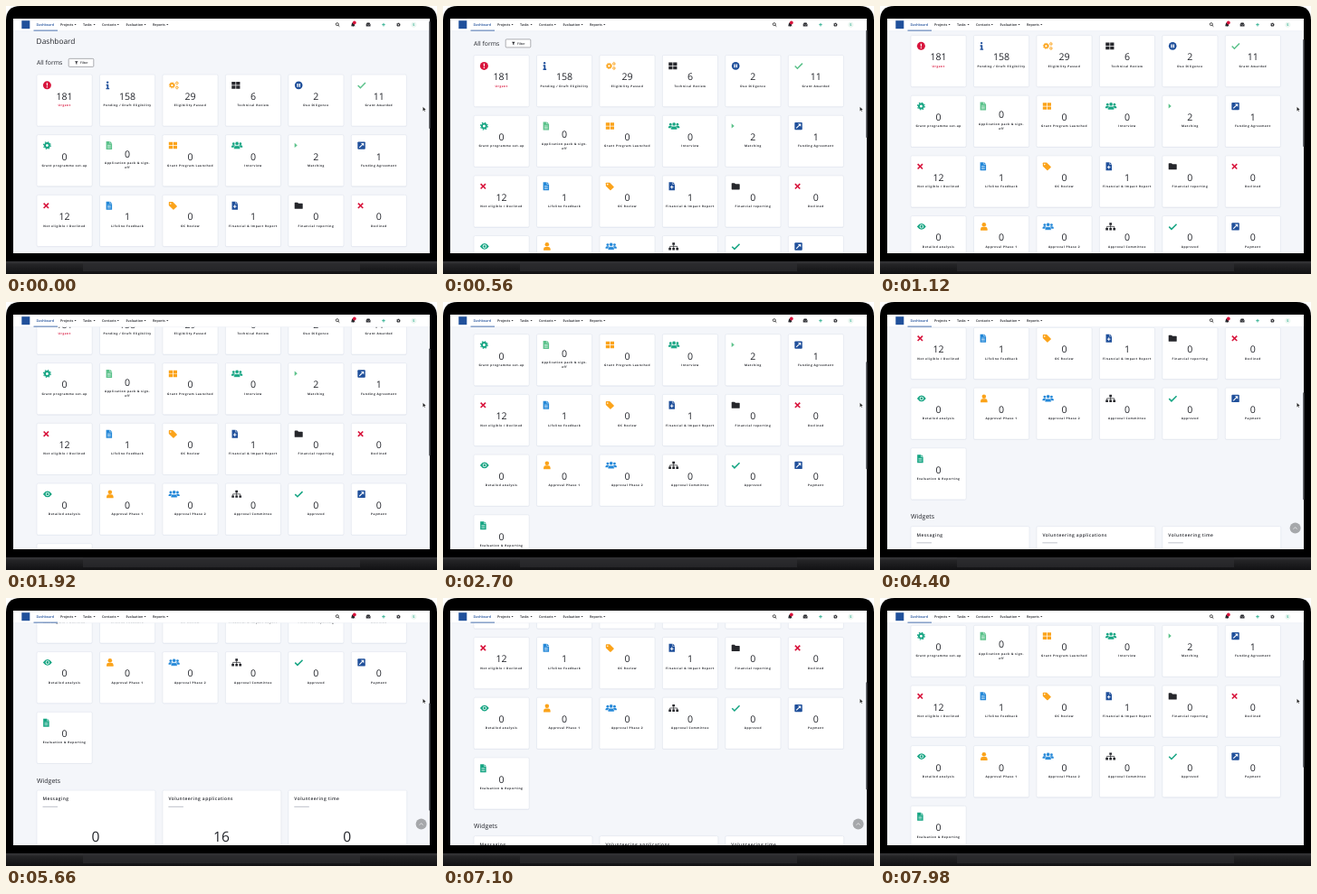
Animation, 476 px wide and 297 px high, one loop 8000 ms. Source, as an HTML page:

```html
<!DOCTYPE html>
<html lang="en">
<head>
<meta charset="utf-8">
<title>Dashboard</title>
<style>
  html, body { margin: 0; width: 100%; height: 100%; overflow: hidden; background: #fff; }
  svg { display: block; width: 100vw; height: 100vh; }
  text { font-family: "Open Sans", "Noto Sans", sans-serif; fill: #23252b; text-rendering: geometricPrecision; }
  .num { font-size: 10.6px; text-anchor: middle; }
  .big { font-size: 15.6px; text-anchor: middle; }
  .label { font-size: 3.2px; font-weight: 700; letter-spacing: .5px; text-anchor: middle; }
  .title { font-size: 4.9px; font-weight: 600; letter-spacing: .45px; }
  .nav { font-size: 3.7px; font-weight: 600; }
  .card { fill: #fff; stroke: #e3e7ef; stroke-width: .7; }
</style>
</head>
<body>
<svg viewBox="0 0 476 297" preserveAspectRatio="none">
  <defs>
    <clipPath id="view"><rect x="8" y="14" width="460" height="260"/></clipPath>
    <linearGradient id="base" x2="0" y2="1">
      <stop offset="0" stop-color="#38383b"/>
      <stop offset=".25" stop-color="#242426"/>
      <stop offset="1" stop-color="#111113"/>
    </linearGradient>
  </defs>
  <path d="M0 297V16Q0 0 16 0H460Q476 0 476 16V297Z"/>
  <rect y="283" width="476" height="14" fill="url(#base)"/>
  <rect x="85" y="283" width="306" height="11" fill="#303033" opacity=".6"/>
  <g clip-path="url(#view)">
    <rect x="8" y="14" width="460" height="260" fill="#f4f6fa"/>
    <g id="page"></g>
    <g id="bar"></g>
    <g id="top">
      <circle cx="458.6" cy="250.6" r="6" fill="#a6a8ab"/>
      <path d="M456.6 251.6l2-2 2 2" fill="none" stroke="#eee" stroke-width=".8"/>
    </g>
    <path d="M460.4 111.8v4.6l1.1-1 .7 1.6.8-.4-.7-1.5h1.5Z" fill="#111" stroke="#fff" stroke-width=".3"/>
  </g>
  <rect id="thumb" x="467.2" width="1.5" height="119" rx=".7" fill="#47494e"/>
</svg>
<script>
const NAVY = '#20509b', RED = '#d8143c', AMBER = '#fba31a', TEAL = '#16a583',
      GREEN = '#5cc28b', BLUE = '#2488d8', INK = '#26272c';
const $ = id => document.getElementById(id);

const text = (cls, x, y, s, extra = '') => `<text class="${cls}" x="${x}" y="${y}" ${extra}>${s}</text>`;
const fill = (d, c) => `<path d="${d}" fill="${c}"/>`;
const line = (d, c, w = 1) => `<path d="${d}" fill="none" stroke="${c}" stroke-width="${w}"/>`;
const dot = (x, y, r, c) => `<circle cx="${x}" cy="${y}" r="${r}" fill="${c}"/>`;

// Ring with eight square teeth
function gear(x, y, r, c) {
  const tooth = 2 * Math.PI * r * .88 / 16;
  return `<g fill="none" stroke="${c}"><circle cx="${x}" cy="${y}" r="${r * .56}" stroke-width="${r * .44}"/>
    <circle cx="${x}" cy="${y}" r="${r * .88}" stroke-width="${r * .26}" stroke-dasharray="${tooth}"/></g>`;
}
const person = (x, y, k, c) => dot(x, y, 2.4 * k, c) +
  fill(`M${x - 4 * k} ${y + 7 * k}v${-1.6 * k}q0 ${-2.6 * k} ${2.6 * k} ${-2.6 * k}h${2.8 * k}q${2.6 * k} 0 ${2.6 * k} ${2.6 * k}v${1.6 * k}Z`, c);

// Icons live in a 10 by 10 box
const icons = {
  alert: c => dot(5, 5, 5, c) + fill('M4.2 2h1.6l-.3 3.8h-1ZM4.3 6.6h1.4V8H4.3Z', '#fff'),
  info: c => dot(2, 1.4, 1.3, c) + fill('M.3 3.8h2.9v4.6h1V10H.2V8.4h1V5.4H.3Z', c),
  cogs: c => gear(4, 5, 3.9, c) + gear(10, 2.3, 2.2, c) + gear(10, 7.8, 2.2, c),
  table: c => fill('M0 .8h4.7v3.8H0ZM5.5.8h4.7v3.8H5.5ZM0 5.4h4.7v3.8H0ZM5.5 5.4h4.7v3.8H5.5Z', c),
  pause: c => dot(5, 5, 4.8, c) + fill('M3 3h1.5v4H3ZM5.5 3H7v4H5.5Z', '#fff'),
  check: c => line('M.6 5.2l3 3L9.8 1.9', c, 1.7),
  gear: c => gear(5, 5, 4.9, c),
  file: c => fill('M.3 0h4.4v2.8h2.8V10H.3ZM5.2 0l2.3 2.3H5.2Z', c) + line('M1.8 4.8h4.2M1.8 6.4h4.2M1.8 8h4.2', '#fff', .6),
  plusFile: c => fill('M.3 0h4.4v2.8h2.8V10H.3ZM5.2 0l2.3 2.3H5.2Z', c) + line('M3.9 4v4M1.9 6h4', '#fff', 1.1),
  users: c => person(2.3, 2.9, .65, c) + person(10.7, 2.9, .65, c) +
    `<g stroke="#fff" stroke-width=".5">${person(6.5, 2.6, .95, c)}</g>`,
  user: c => person(5, 2.5, 1.05, c),
  caret: c => fill('M0 1.8L3.4 4.8 0 7.8Z', c),
  link: c => `<rect x=".2" y=".4" width="9.4" height="9.2" rx="1" fill="${c}"/>` +
    line('M2.3 7.6l4-4', '#fff', 1.2) + fill('M4.2 2.1h3.7v3.7Z', '#fff'),
  cross: c => line('M.8 2l6 6M6.8 2l-6 6', c, 1.8),
  tag: c => fill('M0 1.2Q0 .4.8.4h4l5 5q.5.5 0 1L6.200 9.800q-.5.4-1 0L0 4.800Z', c) + dot(2.2, 2.6, .9, '#fff'),
  folder: c => fill('M0 1.6q0-.6.6-.6h3l1.200 1.300h4.600q.6 0 .6.6V8.400q0 .6-.6.6H.6Q0 9 0 8.400Z', c),
  eye: c => fill('M0 5Q5.500-2.500 11 5 5.500 12.500 0 5Z', c) + dot(5.5, 5, 2.4, '#fff') + dot(5.5, 5, 1.5, c),
  tree: c => fill('M4.500.4h3v2.700h-3ZM0 6.700h3v2.700H0ZM4.500 6.700h3v2.700h-3ZM9 6.700h3v2.700H9Z', c) +
    line('M6 3v4M1.500 7V4.900h9V7', c, .8)
};

const rows = [
  [['alert', RED, 181, 'Urgent'], ['info', NAVY, 158, 'Pending / Draft Eligibility'],
   ['cogs', AMBER, 29, 'Eligibility Passed'], ['table', INK, 6, 'Technical Review'],
   ['pause', NAVY, 2, 'Due Diligence'], ['check', GREEN, 11, 'Grant Awarded']],
  [['gear', TEAL, 0, 'Grant programme set-up'], ['file', GREEN, 0, 'Application pack &amp; sign-|off'],
   ['table', AMBER, 0, 'Grant Program Launched'], ['users', TEAL, 0, 'Interview'],
   ['caret', GREEN, 2, 'Matching'], ['link', NAVY, 1, 'Funding Agreement']],
  [['cross', RED, 12, 'Not eligible / Declined'], ['file', BLUE, 1, 'Lifeline Feedback'],
   ['tag', AMBER, 0, 'OC Review'], ['plusFile', NAVY, 1, 'Financial &amp; Impact Report'],
   ['folder', INK, 0, 'Financial reporting'], ['cross', RED, 0, 'Declined']],
  [['eye', TEAL, 0, 'Detailed analysis'], ['user', AMBER, 0, 'Approval Phase 1'],
   ['users', BLUE, 0, 'Approval Phase 2'], ['tree', INK, 0, 'Approval Committee'],
   ['check', TEAL, 0, 'Approved'], ['link', NAVY, 0, 'Payment']],
  [['file', TEAL, 0, 'Evaluation &amp; Reporting']]
];

const box = (x, y, w, h) => `<rect x="${x}" y="${y + .6}" width="${w}" height="${h}" rx="1.5" fill="#e4e8f0"/>
  <rect class="card" x="${x}" y="${y}" width="${w}" height="${h}" rx="1.5"/>`;

function card([icon, color, n, label], col, row) {
  const x = 34 + col * 69.45, y = 76 + row * 66.7, mid = x + 30.6;
  const parts = label.split('|'), up = parts.length > 1 ? 2.7 : 0;
  const tint = label === 'Urgent' ? `style="fill:${RED}"` : '';
  return box(x, y, 61.2, 57.2) +
    `<g transform="translate(${x + 6.9} ${y + 7.4}) scale(.9)">${icons[icon](color)}</g>` +
    text('num', mid, y + 27.9 - up, n) +
    parts.map((s, i) => text('label', mid, y + 35.2 - up + i * 5.2, s, tint)).join('');
}

function widget(title, n, i) {
  const x = 34 + i * 138.9;
  return box(x, 429.6, 131, 81) + text('title', x + 6.5, 440.8, title) +
    line(`M${x + 6.5} 447.9h16.5`, '#9299a8', .6) + text('big', x + 65, 486.2, n);
}

$('page').innerHTML =
  text('', 33.6, 42, 'Dashboard', 'font-size="8.3"') +
  text('', 34, 65.4, 'All forms', 'font-size="6.8"') +
  '<rect x="69.200" y="58.400" width="27.600" height="9" rx="1" fill="#fff" stroke="#777a80" stroke-width=".6"/>' +
  fill('M76 61.300h3.600l-1.300 1.600v2l-1-.7v-1.300Z', INK) +
  text('nav', 82, 64.2, 'Filter', 'style="font-size:3.400px"') +
  rows.map((r, i) => r.map((c, j) => card(c, j, i)).join('')).join('') +
  text('', 34, 421.4, 'Widgets', 'font-size="7"') +
  [['Messaging', 0], ['Volunteering applications', 16], ['Volunteering time', 0]]
    .map(([s, n], i) => widget(s, n, i)).join('');

const menu = [['Projects', 60, 76.6], ['Tasks', 85, 97.6], ['Contacts', 106, 123.8],
              ['Evaluation', 132.5, 153.6], ['Reports', 162, 178.2]];
$('bar').innerHTML =
  '<rect x="8" y="27.400" width="460" height=".7" fill="#e2e6ee"/><rect x="8" y="14" width="460" height="13.500" fill="#fff"/>' +
  `<rect x="17.300" y="16.200" width="9" height="9" fill="${NAVY}"/>` +
  text('nav', 33.6, 21.9, 'Dashboard', `style="fill:${NAVY}"`) +
  `<rect x="30.500" y="26.700" width="26.500" height=".8" fill="${NAVY}"/>` +
  menu.map(([s, x, a]) => text('nav', x, 21.9, s) + fill(`M${a - 1.1} 20h2.200l-1.100 1.300Z`, INK)).join('') +
  '<circle cx="365.800" cy="20.200" r="1.500" fill="none" stroke="#222" stroke-width=".8"/>' + line('M366.900 21.300l1.400 1.400', '#222', .9) +
  fill('M380.900 22.200q.8-.6.8-2 0-2 1.600-2t1.600 2q0 1.400.8 2ZM382.600 22.500h1.400q-.7 1-1.400 0Z', INK) + dot(384.8, 18.5, 1.9, RED) +
  fill('M397.700 20.600l1-2h2.800l1 2v2h-4.800Z', INK) + line('M398.500 20.600h1l.3.6h.8l.3-.6h1', '#fff', .4) +
  line('M417 18.900v3.600M415.200 20.700h3.600', TEAL, .8) +
  gear(433.4, 20.7, 2.3, INK) +
  dot(450.3, 20.7, 3, '#eaf6f0') + text('nav', 450.3, 22, 'S', `text-anchor="middle" style="fill:${TEAL}"`);

// time, scroll offset, speed per ms
const keys = [[0, 0, .0375], [1120, 43.5, .0395], [2700, 107, .0425], [4400, 181, .043],
              [5740, 216.7, 0], [6150, 216.7, 0], [7100, 166, -.0605], [8000, 111.3, -.061]];

function scrollAt(t) {
  const i = keys.findIndex(k => t < k[0]);
  const [t0, a, va] = keys[i - 1], [t1, b, vb] = keys[i];
  const d = t1 - t0, u = (t - t0) / d, w = 1 - u;
  return a * w * w * (1 + 2 * u) + b * u * u * (1 + 2 * w) + d * u * w * (va * w - vb * u);
}

function draw() {
  const s = scrollAt(performance.now() % 8000);
  $('page').setAttribute('transform', `translate(0 ${-s})`);
  $('thumb').setAttribute('y', 17 + s * .46);
  $('top').setAttribute('opacity', Math.min(1, Math.max(0, (s - 132) / 10)));
  requestAnimationFrame(draw);
}
draw();
</script>
</body>
</html>
```
